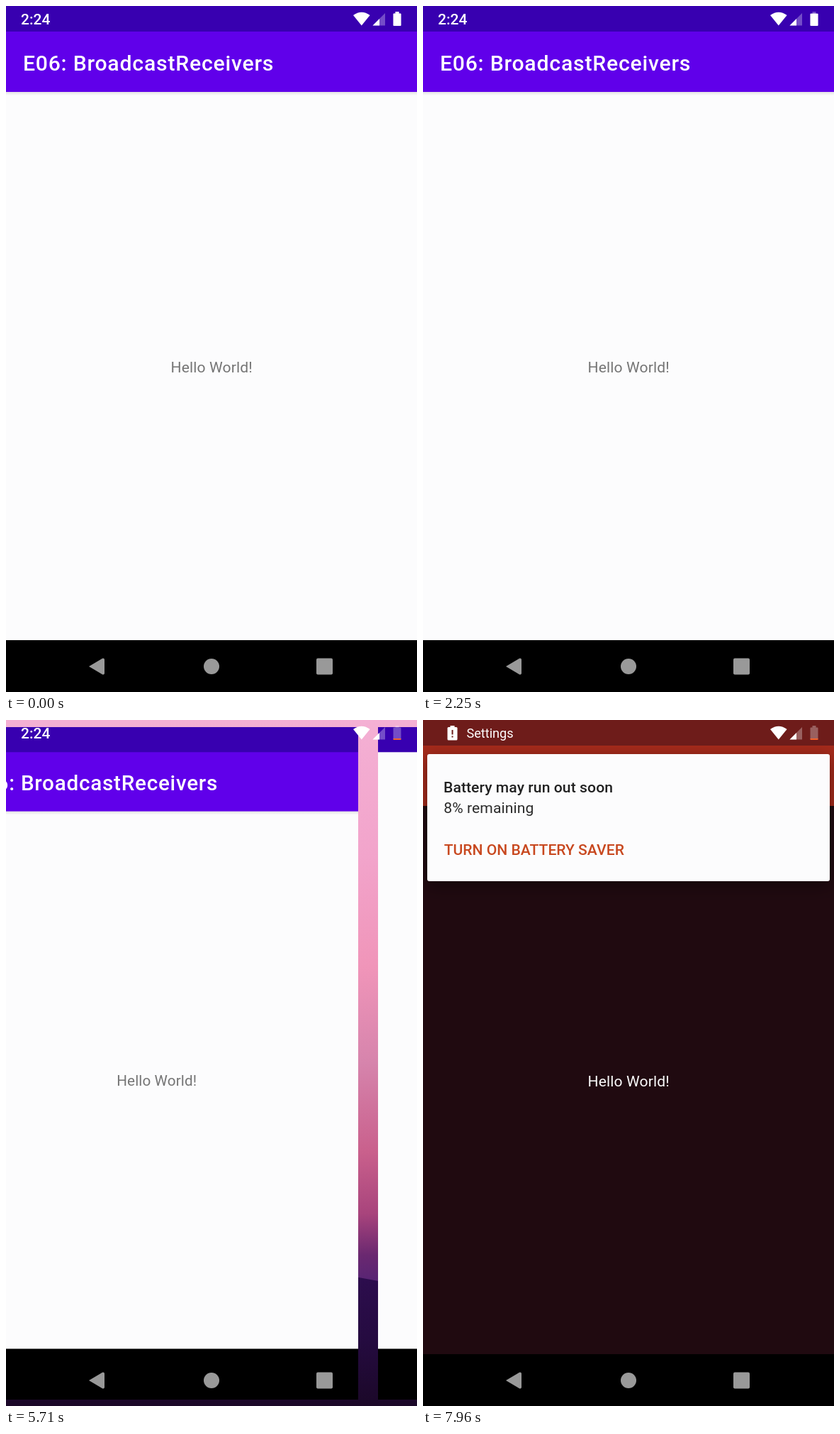
Animation, 580 px wide and 966 px high, one loop 8000 ms. Source, as an HTML page with a canvas:

```html
<!DOCTYPE html>
<html lang="en">
<head>
<meta charset="utf-8">
<title>Battery receiver</title>
<style>
html, body { margin: 0; width: 100%; height: 100%; overflow: hidden; background: #000; }
canvas { display: block; }
</style>
</head>
<body>
<canvas id="stage" width="580" height="966"></canvas>
<script>
const W = 580, H = 966, LOOP = 8000;
const ctx = document.getElementById('stage').getContext('2d');

const clamp = x => Math.max(0, Math.min(1, x));
const span = (t, a, b) => clamp((t - a) / (b - a));
const smooth = x => x * x * (3 - 2 * x);
const mix = (a, b, k) => `rgb(${a.map((v, i) => Math.round(v + (b[i] - v) * k))})`;

// Piecewise linear value through [time, value] points
function along(t, points) {
  let [t0, v0] = points[0];
  for (const [t1, v1] of points) {
    if (t < t1) return v0 + (v1 - v0) * span(t, t0, t1);
    [t0, v0] = [t1, v1];
  }
  return v0;
}

function rect(x, y, w, h, color) {
  ctx.fillStyle = color;
  ctx.fillRect(x, y, w, h);
}

function rounded(x, y, w, h, r, color) {
  ctx.fillStyle = color;
  ctx.beginPath();
  ctx.roundRect(x, y, w, h, r);
  ctx.fill();
}

function poly(color, ...points) {
  ctx.fillStyle = color;
  ctx.beginPath();
  points.forEach(p => ctx.lineTo(...p));
  ctx.closePath();
  ctx.fill();
}

function text(str, x, y, size, color, { weight = 400, spacing = 0, align = 'left' } = {}) {
  ctx.font = `${weight} ${size}px Roboto, sans-serif`;
  ctx.letterSpacing = spacing + 'px';
  ctx.textAlign = align;
  ctx.fillStyle = color;
  ctx.fillText(str, x, y);
}

function vertical(y0, y1, stops) {
  const g = ctx.createLinearGradient(0, y0, 0, y1);
  stops.forEach(([at, color]) => g.addColorStop(at, color));
  return g;
}

const leftSky = vertical(0, H, [
  [0, '#f4b0d4'], [.36, '#f4acce'], [.52, '#f0a4c4'], [.63, '#e48fa8'],
  [.68, '#c868a0'], [.745, '#cb5186'], [.79, '#8a2f78'], [.82, '#6a2870']
]);
const rightSky = vertical(0, H, [
  [0, '#f4b0d4'], [.2, '#f2a4cb'], [.36, '#f095b9'], [.5, '#d684ac'],
  [.63, '#c9608c'], [.72, '#a8447c'], [.78, '#6a2870'], [.82, '#572474']
]);
const hill = vertical(780, H, [[0, '#2d0d4e'], [.5, '#250b40'], [1, '#1b0828']]);
const barShadow = vertical(121, 126, [[0, 'rgba(0,0,0,.1)'], [1, 'rgba(0,0,0,0)']]);

const white = [252, 252, 253];
const light = { status: [56, 0, 176], bar: [96, 0, 234], page: white, ink: '#757575' };
const dark = { status: [110, 28, 26], bar: [164, 42, 27], page: [32, 10, 16], ink: '#fafafa' };
const empty = { status: light.status, bar: white, page: white };

function wallpaper() {
  const column = W / 20;
  rect(0, 0, W, H, leftSky);
  for (let x = 0; x < W; x += column) {
    ctx.globalAlpha = clamp(x / 490);
    rect(x, 0, column, H, rightSky);
  }
  ctx.globalAlpha = 1;
  poly(hill, [0, 795], [40, 785], [120, 772], [300, 768], [498, 785], [W, 800], [W, H], [0, H]);
}

// App window, fading in from an empty one
function app(theme, shown = 1) {
  const color = part => mix(empty[part], theme[part], shown);
  rect(0, 0, W, H, color('page'));
  rect(0, 0, W, 121, color('bar'));
  rect(0, 0, W, 36, color('status'));
  rect(0, 893, W, H - 893, '#000');
  ctx.globalAlpha = clamp(shown * 1.5);
  rect(0, 121, W, 5, barShadow);
  text('E06: BroadcastReceivers', 23.9, 90.8, 30.2, '#fff', { weight: 500, spacing: .78 });
  text('Hello World!', 290.2, 515.5, 21.1, theme.ink, { spacing: .12, align: 'center' });
  ctx.globalAlpha = 1;
}

// Draws a full-screen window scaled around the stage middle, on whole pixels
function windowAt(dx, scale, draw) {
  const w = Math.round(W * scale), h = Math.round(H * scale);
  ctx.save();
  ctx.translate(Math.round((W - w) / 2 + dx), Math.round((H - h) / 2));
  ctx.beginPath();
  ctx.rect(0, 0, w, h);
  ctx.clip();
  ctx.scale(w / W, h / H);
  draw();
  ctx.restore();
}

function screens(t) {
  if (t < 5638) return app(light);
  const slide = smooth(span(t, 5638, 5961));
  const scale = along(t, [[5638, 1], [5710, .981], [5800, .953], [5920, .95], [6150, 1]]);
  const pitch = (W + 29) * scale;
  wallpaper();
  windowAt(-slide * pitch, scale, () => app(light));
  windowAt((1 - slide) * pitch, scale, () => app(dark, span(t, 5780, 5989)));
}

function statusIcons(t) {
  // Wi-Fi
  ctx.fillStyle = '#fff';
  ctx.beginPath();
  ctx.moveTo(501.8, 27.5);
  ctx.lineTo(490, 13);
  ctx.quadraticCurveTo(501.8, 4.5, 513.6, 13);
  ctx.fill();
  // Signal
  poly('rgba(255,255,255,.3)', [535, 10], [535, 27.5], [517.5, 27.5]);
  poly('#fff', [527, 18], [527, 27.5], [517.5, 27.5]);
  // Battery drains from the top down
  const low = t >= 5380;
  const level = low ? 26 : t >= 5170 ? 25 : along(t, [[1710, 8], [5000, 23]]);
  const shape = new Path2D();
  shape.rect(549.5, 8, 5, 2.5);
  shape.roundRect(546.5, 10.5, 11, 17.5, 1);
  ctx.fillStyle = 'rgba(255,255,255,.3)';
  ctx.fill(shape);
  ctx.save();
  ctx.clip(shape);
  rect(546, level, 12, 30 - level, low ? '#f4622c' : '#fff');
  ctx.restore();
}

function statusLabel(t) {
  const alert = span(t, 6180, 6300);
  const hole = mix(dark.status, dark.status, 0);
  ctx.globalAlpha = 1 - alert;
  text('2:24', 21, 26.2, 21, '#fff', { weight: 500 });
  ctx.globalAlpha = alert;
  rect(38.5, 8, 6, 3, '#fff');
  rounded(34.5, 10, 14, 18.5, 1.5, '#fff');
  rect(40.5, 14, 2, 6.5, hole);
  rect(40.5, 22.5, 2, 2, hole);
  text('Settings', 61.5, 25, 18.1, '#fff');
  ctx.globalAlpha = 1;
}

function navIcons(t) {
  const bright = span(t, 5720, 5860) - span(t, 7300, 7600);
  ctx.globalAlpha = .6 + .4 * bright;
  ctx.fillStyle = '#fff';
  ctx.beginPath();
  ctx.moveTo(117, 930);
  ctx.arcTo(139, 917, 139, 930, 2);
  ctx.arcTo(139, 943, 117, 930, 2);
  ctx.closePath();
  ctx.fill();
  ctx.beginPath();
  ctx.arc(290, 930, 11, 0, 7);
  ctx.fill();
  rounded(438, 918.5, 23, 23, 2, '#fff');
  ctx.globalAlpha = 1;
}

function card(t) {
  if (t < 6150) return;
  const rest = 1 - span(t, 6150, 6560);
  const dy = -294 * rest ** 4;
  const left = 6 + 8.8 * rest, right = 574 - 196 * rest;
  const top = 48 + dy + 2.6 * rest, bottom = 227 + dy - 38 * rest;
  ctx.save();
  ctx.shadowColor = 'rgba(0,0,0,.4)';
  ctx.shadowBlur = 22;
  ctx.shadowOffsetY = 6;
  rounded(left, top, right - left, bottom - top, 3, '#fcfcfd');
  ctx.restore();
  ctx.save();
  ctx.beginPath();
  ctx.rect(left, top, right - left, bottom - top);
  ctx.clip();
  text('Battery may run out soon', 29, 101.5 + dy, 21.1, '#212121', { weight: 500, spacing: .08 });
  text('8% remaining', 29.3, 130.7 + dy, 21.1, '#2c2c2c', { spacing: .08 });
  text('TURN ON BATTERY SAVER', 29.7, 190.3 + dy, 21.1, '#c8481f', { weight: 500 });
  ctx.restore();
}

function frame() {
  const t = performance.now() % LOOP;
  screens(t);
  card(t);
  statusIcons(t);
  statusLabel(t);
  navIcons(t);
  requestAnimationFrame(frame);
}
frame();
</script>
</body>
</html>
```
